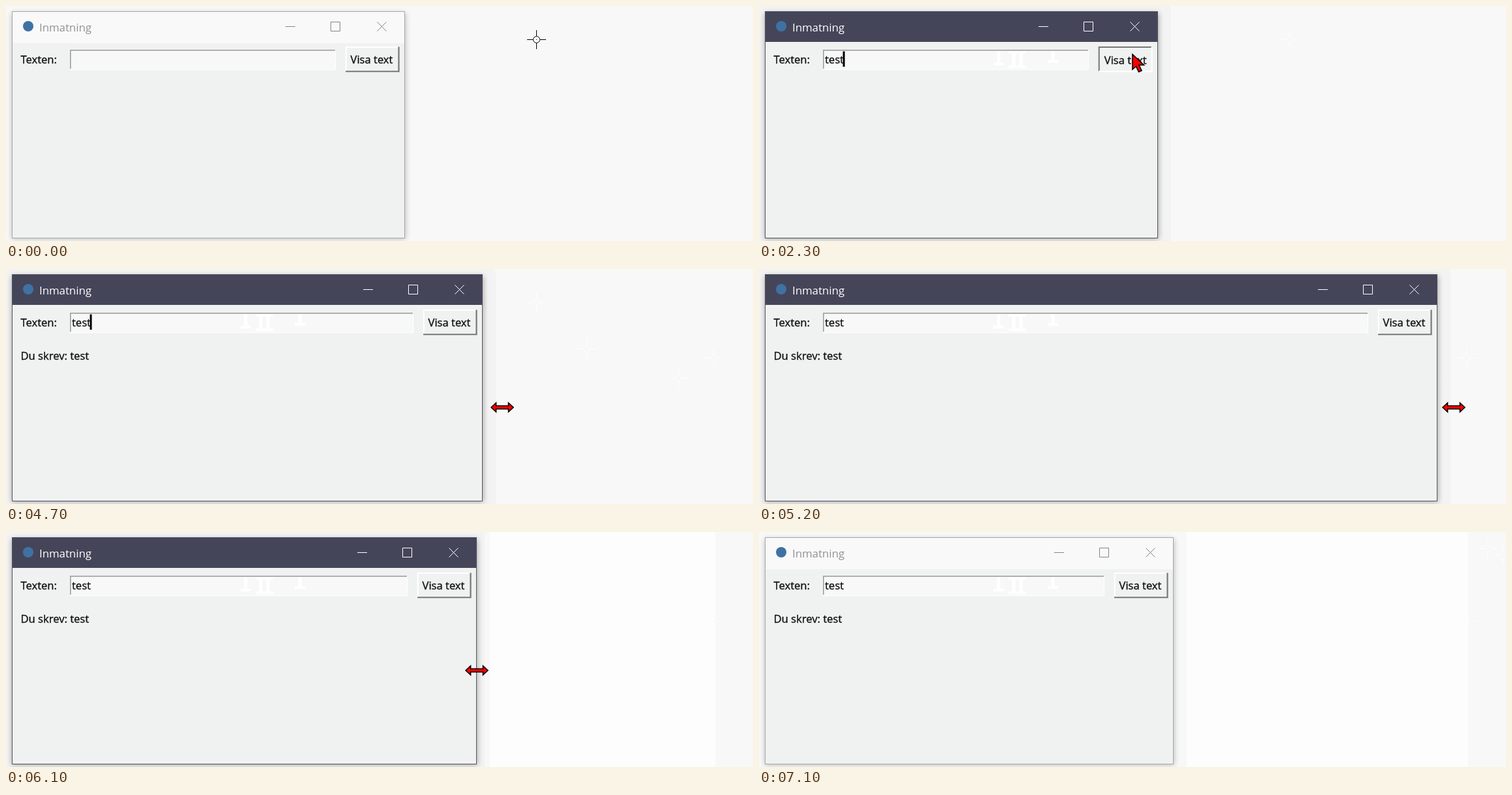
These frames come from a looping animation (1144x360 px, 7200 ms). An HTML page:

```html
<!DOCTYPE html>
<html lang="sv">
<head>
<meta charset="utf-8">
<title>Inmatning</title>
<style>
  html, body { margin: 0; width: 100%; height: 100%; overflow: hidden; background: #f8f8f8; }
  svg { display: block; width: 1144px; height: 360px; }
  text { font-family: "Open Sans", "Noto Sans", sans-serif; font-size: 16.6px; white-space: pre; }
  .label { fill: #111; stroke: #111; stroke-width: .35; }
  .red { fill: #f00; stroke: #000; stroke-width: 1.6; stroke-linejoin: miter; }
</style>
</head>
<body>
<svg viewBox="0 0 1144 360">
  <defs>
    <filter id="blur" x="-10%" y="-10%" width="120%" height="120%"><feGaussianBlur stdDeviation="4"/></filter>
    <clipPath id="inField"><rect x="100" y="69" width="1000" height="28"/></clipPath>
    <g id="cross">
      <path d="M-14 .5H-5M6 .5H15M.5 -14V-5M.5 6V15" stroke-width="1" fill="none"/>
      <circle cx=".5" cy=".5" r="5" stroke-width="1"/>
      <path d="M0 .5H1" stroke-width="1"/>
    </g>
    <path id="beam" d="M-8 -13H8V-9H2.5V9H8V13H-8V9H-2.5V-9H-8Z"/>
    <path id="arrow" d="M0 0V23L5.5 18.5L9.5 27L14 25L10 16.5H17.5Z"/>
    <path id="resize" d="M-17 0L-9.5 -7V-2.5H9.5V-7L17 0L9.5 7V2.5H-9.5V7Z"/>
  </defs>

  <g id="marks" fill="none" stroke="#fff"></g>
  <rect id="cleared" y="0" height="360" fill="#fdfdfd"/>
  <rect id="halo" x="-11" y="-12" height="400" rx="20" fill="#000" opacity=".02"/>
  <rect id="shadow" x="9" y="11" height="346" fill="#000" filter="url(#blur)"/>

  <rect id="body" x="9.5" y="8.5" height="347" fill="#f0f1f1"/>
  <rect id="bar" x="10" y="9"/>
  <circle cx="34" cy="31" r="8" fill="#3f72a3"/>
  <text id="title" x="51" y="39" style="font-size:16.8px">Inmatning</text>

  <text class="label" x="22.5" y="88">Texten:</text>
  <rect id="field" x="98" y="67" height="30" fill="#f8f8f8"/>
  <g id="trail" fill="#fff" clip-path="url(#inField)"></g>
  <path id="fieldLight" fill="none" stroke="#fff"/>
  <path id="fieldDark" fill="none" stroke="#999" stroke-width="1.5"/>
  <text class="label" id="typed" x="101" y="88"></text>
  <rect id="caret" y="69.5" width="3" height="23.5"/>
  <text class="label" id="answer" x="22.5" y="139">Du skrev: test</text>

  <g id="right">
    <path id="controls" fill="none" d="M-183 31.5H-168M-113.5 24.5H-99.5V38.5H-113.5ZM-42.5 24.5L-28.5 38.5M-28.5 24.5L-42.5 38.5"/>
    <rect x="-91" y="62" width="82" height="39" fill="#f0f1f1"/>
    <path id="edgeA" d="M-90.25 101V63H-9" fill="none" stroke-width="2"/>
    <path id="edgeB" d="M-91 100.25H-9.5V62.5" fill="none" stroke-width="2.2"/>
    <text class="label" id="press" x="-83.5" y="88">Visa text</text>
  </g>
  <use id="pointer"/>
</svg>
<script>
const LOOP = 7200, STEP = 100;
const el = id => document.getElementById(id);
const set = (id, attrs) => {
  for (const k in attrs) el(id).setAttribute(k, attrs[k]);
};
const show = (id, on) => set(id, { visibility: on ? "visible" : "hidden" });

// Pointer stops: time, shape, x, y
const stops = [
  [0, "cross", 812, 51], [100, "beam", 450, 74], [200, "beam", 401, 82],
  [300, "beam", 366, 78], [800, "beam", 367, 78], [1200, ""],
  [1600, "beam", 390, 82], [1700, "beam", 401, 82], [1800, "beam", 450, 74],
  [1900, "arrow", 530, 58], [2000, "arrow", 565, 70], [2100, "arrow", 572, 74],
  [2800, "cross", 889, 122], [2900, "cross", 1083, 136], [3000, "cross", 1060, 136],
  [3100, "cross", 1030, 137], [3300, "cross", 1030, 166], [3400, "cross", 860, 186],
  [3500, "cross", 684, 199], [3600, "cross", 645, 207], [3700, "resize", 622, 210],
  [3900, "resize", 621, 212], [6700, "cross", 760, 170], [6800, "cross", 1065, 46],
  [6900, "cross", 1115, 25], [7000, "cross", 1139, 35], [7100, ""]
];
// Drag positions: time, x
const dragX = [[4200, 621], [4400, 640], [4700, 760], [5000, 955], [5200, 1064], [5400, 1078],
  [5500, 1077], [5700, 1045], [5800, 990], [6000, 800], [6100, 721], [6300, 672], [6600, 645]];
const edgeX = [[4200, 611], [4400, 623], [4700, 730], [5000, 932], [5200, 1039], [5400, 1067],
  [5600, 1062], [5800, 985], [6000, 804], [6100, 721], [6300, 664], [6600, 635]];
const words = [[0, ""], [1200, "t"], [1300, "te"], [1500, "tes"], [1700, "test"]];
// Faint white traces left where the pointer has been
const marks = [[100, 812, 51], [2900, 889, 122], [3000, 1083, 136], [3400, 1030, 166],
  [7000, 1115, 25], [7100, 1139, 35]];
const trail = [[1700, 367, 78], [1700, 390, 82], [1800, 401, 82], [1900, 450, 74]];

const last = (list, t) => list.filter(p => p[0] <= t).pop();
const between = (t, a, b) => t >= a && t < b;

function track(keys, t) {
  if (t <= keys[0][0]) return keys[0][1];
  for (let i = 1; i < keys.length; i++) {
    const [a, x] = keys[i - 1], [b, y] = keys[i];
    if (t <= b) return Math.round(x + (y - x) * (t - a) / (b - a));
  }
  return keys[keys.length - 1][1];
}

function addTraces(group, shape, list) {
  return list.map(([at, x, y]) => {
    const use = document.createElementNS("http://www.w3.org/2000/svg", "use");
    use.setAttribute("href", "#" + shape);
    use.setAttribute("transform", `translate(${x} ${y})`);
    el(group).append(use);
    return { at, use };
  });
}
const traces = [...addTraces("marks", "cross", marks), ...addTraces("trail", "beam", trail)];

function caretOn(t) {
  if (t < 2500) return between(t, 400, 1000) || t >= 1200;
  return between(t, 2800, 7000) && (t - 2800) % 900 < 600;
}

function drawPointer(t) {
  let [, shape, x, y] = last(stops, t);
  show("pointer", shape);
  if (!shape) return;
  if (shape === "resize" && t >= 4200) x = track(dragX, t);
  set("pointer", {
    href: "#" + shape, transform: `translate(${x} ${y})`,
    class: shape === "cross" ? "" : "red",
    fill: "#fff", stroke: "#000"
  });
}

function draw(t) {
  const edge = track(edgeX, t), active = between(t, 400, 7000), pressed = between(t, 2300, 2500);
  const end = edge - 106, clearFrom = edge + (active ? 12 : 20);

  set("halo", { width: edge + 31 });
  show("halo", active);
  set("shadow", { width: edge - 8, opacity: active ? .32 : .24 });
  set("cleared", { x: clearFrom, width: Math.max(0, 1086 - clearFrom) });
  show("cleared", t >= 5600);
  set("body", { width: edge - 10, stroke: active ? "#51515e" : "#a6a6a6" });
  set("bar", { width: edge - 11, height: active ? 46 : 48, fill: active ? "#45455a" : "#f9f9f9" });
  set("title", { fill: active ? "#fff" : "#929292" });
  set("controls", { stroke: active ? "#fff" : "#858585" });
  set("right", { transform: `translate(${edge} 0)` });

  set("field", { width: end - 98 });
  set("fieldLight", { d: `M98 97.5H${end - .5}V67` });
  set("fieldDark", { d: `M98.75 96V67.75H${end - 1}` });
  set("edgeA", { stroke: pressed ? "#777" : "#fff" });
  set("edgeB", { stroke: pressed ? "#fff" : "#777" });
  set("press", { transform: pressed ? "translate(1.3 1.3)" : "" });

  const word = last(words, t)[1];
  el("typed").textContent = word;
  set("caret", { x: 99.5 + (word ? el("typed").getComputedTextLength() : 0) });
  show("caret", caretOn(t));
  show("answer", t >= 2500);

  for (const { at, use } of traces) use.setAttribute("visibility", t >= at ? "visible" : "hidden");
  drawPointer(t);
}

const start = performance.now();
function tick() {
  const t = (performance.now() - start) % LOOP;
  draw(Math.floor(t / STEP) * STEP);
  requestAnimationFrame(tick);
}
tick();
</script>
</body>
</html>
```
